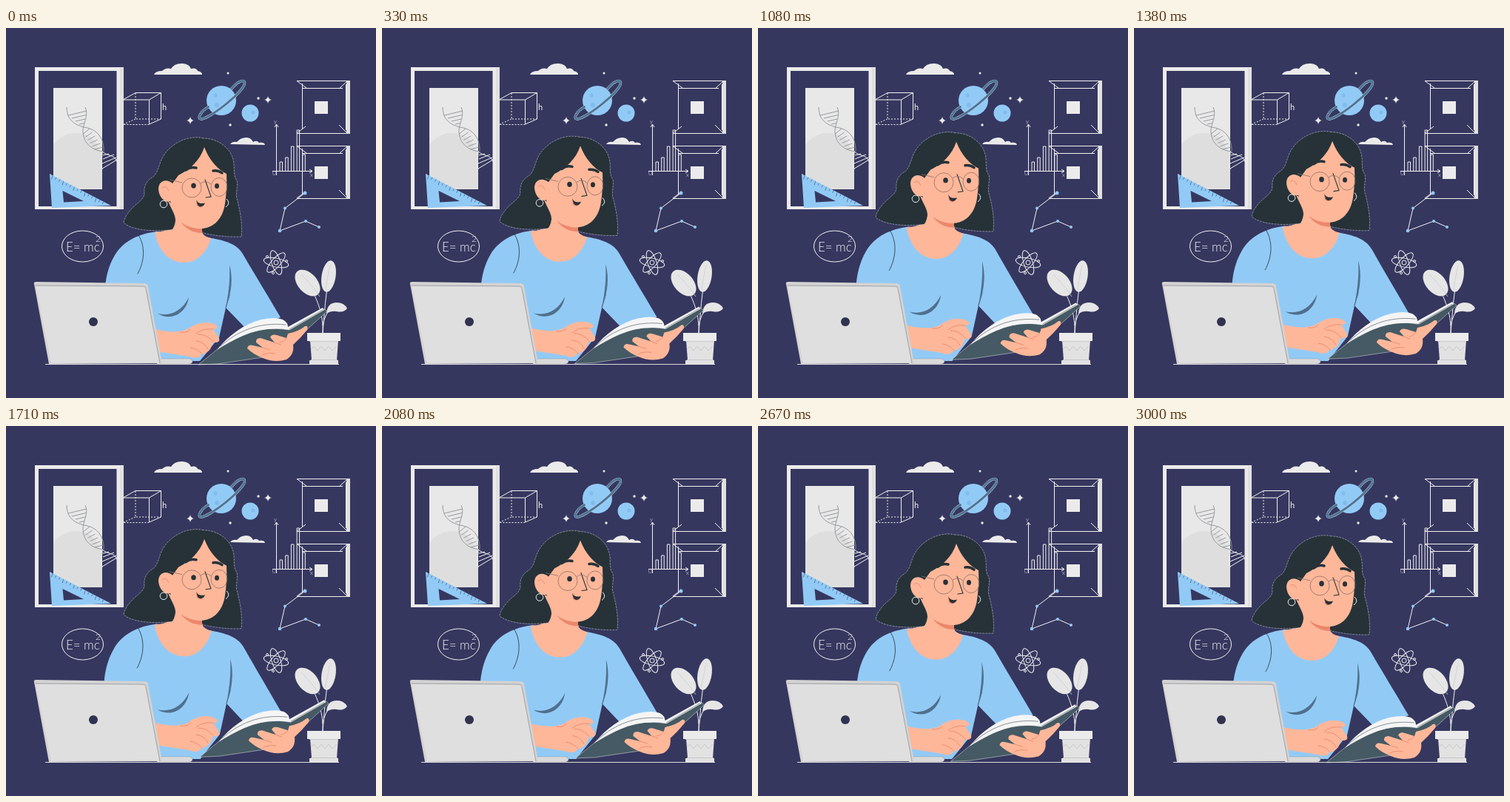
An HTML page that plays this animation: 500 px wide and 500 px high, repeating every 3040 ms.

```html
<!DOCTYPE html>
<html lang="en">
<head>
<meta charset="utf-8">
<title>Studying</title>
<style>
  html, body { margin: 0; width: 100%; height: 100%; overflow: hidden; background: #36375f; }
  svg { display: block; width: 100vw; height: 100vh; }
  .line { fill: none; stroke: #f2f2f2; stroke-width: 1; }
  .thin { fill: none; stroke: #263238; stroke-width: .8; stroke-linecap: round; }
  .pale { fill: #ebebeb; }
  .blue { fill: #92caf6; }
  .hair { fill: #263238; stroke: #d5d8e0; stroke-width: .5; stroke-dasharray: 3 1; }
  .skin { fill: #ffb799; }
  .crease { fill: none; stroke: #e68a70; stroke-width: .9; stroke-linecap: round; }
  text { font-family: Lato, sans-serif; font-weight: 300; fill: #f5f5f5; }
</style>
</head>
<body>
<svg viewBox="0 0 500 500" preserveAspectRatio="xMidYMid meet">
  <defs>
    <g id="box">
      <path class="line" d="M393 71.500H461M400 81.500H455M400.500 75V137M393 142.500H461M393 71.500L406 81M461 72L450 82M461 142L450 131M393 142L405 133"/>
      <path d="M460 71H465V143H460Z" fill="#e0e0e0"/>
      <path class="line" d="M459.500 76V138"/>
      <rect class="pale" x="417" y="99" width="18" height="17"/>
    </g>
    <path id="spark" class="pale" d="M0-5Q.8-.8 5 0Q.8.8 0 5Q-.8.8-5 0Q-.8-.8 0-5Z"/>
  </defs>
  <rect width="500" height="500" fill="#36375f"/>

  <!-- Picture frame, helix and set square -->
  <path class="pale" fill-rule="evenodd" d="M39 53H159V245H39ZM44 58V241H149.500V58Z"/>
  <path d="M154 54H159V245H154Z" fill="#e0e0e0"/>
  <rect x="64" y="81" width="66" height="137" fill="#e8e8e8"/>
  <path d="M64 158C77 140 103 136 118 151Q126 159 130 174V218H64Z" fill="#dedede"/>
  <g fill="none" stroke="#8e9296" stroke-width=".9">
    <path d="M82 107C82 122 90 130 105 134C122 136 133 148 132 167M107 107C112 118 105 126 104 138C104 154 113 164 131 167"/>
    <path id="rungs"/>
  </g>
  <path class="line" d="M130 167C138 174 145 170 150 180M130 167C130 178 127 184 130 191M131 172L139 170M131 177L146 171M130 183L149 175M130 190L150 178"/>
  <path class="blue" fill-rule="evenodd" d="M59 197L142 240L62 243ZM76.500 220L78 235.500L105 234Z"/>
  <path id="ticks" stroke="#42678e" stroke-width=".8"/>

  <!-- Cube -->
  <path class="line" d="M158 97H193.500V130M158 97L175 87.500H209.500V123L193.500 130M193.500 97L209.500 87.500"/>
  <path class="line" stroke-dasharray="2 2" d="M175 88V123H209M175 123L158 130.500H193"/>
  <text x="211" y="111" font-size="11" style="font-weight:400">h</text>

  <!-- Sky -->
  <path class="pale" d="M200 63Q202 58 211 58Q216 53 223 55Q228 47 239 48Q248 49 250 55Q257 53 259 58Q265 59 265 63Z"/>
  <path class="pale" d="M303 157Q306 153 312 154Q317 148 325 148Q331 148 334 154Q339 151 342 155Q349 154 350 158Z"/>
  <circle class="blue" cx="291" cy="98" r="20"/>
  <g fill="#7fbbee"><circle cx="283" cy="91" r="2.500"/><circle cx="285" cy="104" r="3"/></g>
  <g transform="translate(292 97.500) rotate(-38)" fill="none">
    <path d="M-19-4C-32-6-39-2-39 1C-38 10 38 10 39-1C39-5 31-7 19-4" stroke="#c4dbea" stroke-width="3.600"/>
    <path d="M-19-4C-32-6-39-2-39 1C-38 10 38 10 39-1C39-5 31-7 19-4" stroke="#4f7392" stroke-width="2.800"/>
  </g>
  <circle class="blue" cx="330" cy="115" r="11.500"/>
  <circle cx="334" cy="114" r="2.500" fill="#7fbbee"/>
  <use href="#spark" x="249" y="125"/><use href="#spark" x="354" y="97"/>
  <g class="pale"><circle cx="341" cy="95" r="1.700"/><circle cx="300" cy="61" r="1.500"/><circle cx="303" cy="131" r="1.700"/></g>

  <!-- Shelves and chart -->
  <use href="#box"/><use href="#box" y="88"/>
  <path class="line" d="M365.500 131V199M360 193.500H413M363 134L365.500 130L368 134M410 191L414 193.500L410 196"/>
  <path class="line" id="bars" stroke-width=".9"/>
  <g font-size="8"><text x="362" y="129">y</text><text x="411" y="201">x</text><text x="360" y="199">0</text></g>
  <path class="line" d="M404 223L377 243.500L370 274L405 261L423 269"/>
  <g class="blue"><circle cx="404" cy="223" r="2.500"/><circle cx="377" cy="243.500" r="2"/><circle cx="370" cy="274" r="2.300"/><circle cx="405" cy="261" r="2"/><circle cx="423" cy="269" r="2"/></g>

  <!-- Formula and atom -->
  <ellipse class="line" cx="103.500" cy="295" rx="28" ry="21"/>
  <g font-size="17"><text x="81" y="302">E=</text><text x="105" y="302">mc</text><text x="121" y="289" font-size="12">2</text></g>
  <g class="line" transform="translate(365 317)">
    <ellipse rx="17" ry="6" transform="rotate(12)"/><ellipse rx="17" ry="6" transform="rotate(72)"/><ellipse rx="17" ry="6" transform="rotate(132)"/>
    <circle r="3"/>
    <circle cx="-12" cy="-8" r="1.500"/><circle cx="14" cy="-2" r="1.500"/><circle cx="-4" cy="14" r="1.500"/>
  </g>

  <!-- Plant -->
  <path class="line" d="M428 412C429 390 423 370 408 344M428 412Q431 370 436 334M428 402Q431 386 440 378"/>
  <g fill="#e6e6e6">
    <ellipse cx="407.500" cy="344.500" rx="21" ry="13" transform="rotate(48 407.500 344.500)"/>
    <ellipse cx="436" cy="335.500" rx="9.500" ry="21.500" transform="rotate(9 436 335.500)"/>
    <path d="M433 386Q434 371 447 371Q457 371 461 379Q456 385 447 383Q439 382 433 386Z"/>
  </g>
  <path d="M399 333Q416 350 424 363M438 320Q434 340 431 356" fill="none" stroke="#cfcfd4" stroke-width=".8"/>

  <g id="torso">
    <path class="blue" d="M204 275C180 278 159 287 147 307C138 322 135 338 134 350L190 450H262L288 418L297 378L326 408L371 391C354 362 336 333 321 307C313 292 297 287 272 283Z"/>
    <path class="skin" d="M221 228L222 270Q216 275 201 276C205 298 218 317 241 317C259 317 272 302 277 284Q266 281 265 276V240Z"/>
    <path class="thin" d="M179 280C188 294 188 314 178 332M297 378L302 361"/>
    <path d="M302 320C307 337 305 359 297 378C301 357 303 341 302 320ZM205 386C223 390 238 382 247 364C244 385 224 397 205 386Z" fill="#4f708c"/>
  </g>

  <g id="head">
    <path class="hair" d="M267 149C246 144 224 156 214 171C206 182 207 194 199 201C188 207 186 216 187 225C185 233 175 238 169 245C163 252 160 257 159 263C167 271 192 277 229 272L243 260L267 277Q291 283 318 282C320 260 315 244 313 234C309 225 314 215 312 206C306 199 310 189 307 178C303 161 285 149 267 149Z"/>
    <path class="skin" d="M219 234C224 246 229 252 229 260Q228 270 222 275L227 285L265 281V263Z"/>
    <path d="M236 262Q248 272 265 270V277Q247 277 236 262Z" fill="#ec876c"/>
    <path class="skin" d="M268 161C262 179 249 191 233 199L225 210C217 203 206 206 206 218C207 230 216 237 222 234C227 252 238 268 258 271C280 273 293 258 296 237Q299 217 298 197C286 191 275 179 268 161Z"/>
    <path class="crease" d="M211 216Q216 211 220 220"/>
    <circle class="line" cx="213" cy="238" r="4.800" stroke-width=".8"/>
    <path class="line" d="M298 231Q304 237 297 242" stroke-width=".8"/>
    <g fill="none" stroke="#263238" stroke-linecap="round">
      <path d="M243 192Q249 187 257 189M280 193Q287 192 292 196" stroke-width="3.500"/>
      <path d="M269 205L277 228L270 229" stroke-width="1.100"/>
    </g>
    <g fill="#263238"><ellipse cx="253.500" cy="213" rx="3.300" ry="3.600"/><ellipse cx="285" cy="213.500" rx="3" ry="3.500"/></g>
    <g fill="none" stroke="#8a736a" stroke-width=".8">
      <circle cx="251" cy="216" r="13"/><ellipse cx="288" cy="215" rx="11" ry="12.500"/>
      <path d="M263 210Q270 205 277 211M238 209L221 205"/>
    </g>
    <path d="M257 233C259 237 264 238 269 237C267 242 262 244 258 240Z" fill="#e47f62"/>
    <path d="M257 232C260 238 264 237.500 269 236.500C266 242 262 243 259 239Z" fill="#263238"/>
  </g>

  <g id="book">
    <path d="M260 455L287 433L320 415Q350 402 383 408L431 380L434 383L395 418L347 445L286 454Z" fill="#455a64" stroke="#e6e6e6" stroke-width=".5"/>
    <path d="M285 435C302 414 322 400 345 394Q364 390 374 394Q381 398 381 404L428 378L430 381L383 408Q350 403 320 416Q301 424 285 435Z" fill="#f5f5f5"/>
    <path class="thin" d="M290 430C312 410 341 397 378 401M383 407L428 381" opacity=".65"/>
    <path class="skin" d="M326 433Q327 427 334 429L347 432L338 425Q337 419 344 419L363 425L357 418Q359 413 366 415L379 419L381 413Q396 410 404 403Q409 402 407 408Q398 419 388 428Q390 441 379 448Q363 453 347 446Q334 441 326 433Z"/>
    <path class="crease" d="M347 432L357 435M363 425L371 428M379 419Q376 424 370 425M346 442Q354 438 363 440"/>
  </g>

  <g id="hand">
    <path class="skin" d="M202 407C218 411 235 412 245 407Q259 397 273 398Q283 399 286 404Q286 407 280 407L288 419Q290 426 280 425L276 434Q271 440 265 441Q258 449 248 444L203 437Z"/>
    <path class="crease" d="M280 407Q266 405 257 413M280 424Q270 413 260 414M273 434Q268 424 257 423M265 441Q259 433 249 432M236 411Q246 412 249 407"/>
  </g>

  <!-- Desk, laptop and pot -->
  <path d="M53 454.500H450" stroke="#d9d9df"/>
  <path d="M204 447H248Q252 448 252 451Q251 454 247 454H204Z" fill="#dadada" stroke="#8d8f98" stroke-width=".4"/>
  <path d="M38 346Q37 343 41 343L187 345Q191 345 192 349L211 453L58 454Z" fill="#d3d3d3"/>
  <path d="M40 348L185 349Q188 349 189 352L208 453H61Z" fill="#dfdfdf"/>
  <path d="M40 348L185 349Q188 349 189 352L208 453" fill="none" stroke="#777b82" stroke-width=".6"/>
  <circle cx="118" cy="397" r="6" fill="#30324f"/>
  <path d="M411 422H449L447 449H449V455H410V449H413Z" fill="#e2e2e2"/>
  <path d="M407 412H452V423H407Z" fill="#ebebeb"/>
  <path d="M410 423.500H449M412 434L416 430L421 436L426 430L431 436L436 430L441 436L447 430M412 448.500H448" fill="none" stroke="#c6c6cb" stroke-width=".9"/>
</svg>
<script>
  const LOOP = 3040;
  const part = id => document.getElementById(id);
  const [torso, head, book, hand] = ["torso", "head", "book", "hand"].map(part);

  const repeat = (count, draw) => Array.from({ length: count }, (_, i) => draw(i)).join("");
  part("ticks").setAttribute("d", repeat(15, i => `M${63 + i * 4.9} ${199.5 + i * 2.54}l-1.500 ${i % 3 ? 3 : 5}`));
  part("rungs").setAttribute("d",
    repeat(4, i => `M${84 + i * 5} ${118 + i * 4}L${109 - i} ${112 + i * 5.5}`) +
    repeat(6, i => `M${104.5 + i * 3} ${143 + i * 4.2}L${113 + i * 3.6} ${136 + i * 5}`));
  part("bars").setAttribute("d", [181, 175, 160, 138, 171]
    .map((top, i) => `M${370 + i * 7.7} 193V${top}h3.500V193`).join(""));

  function render(time) {
    const breath = Math.sin(Math.PI * (time % LOOP) / LOOP) ** 1.5;
    const move = (el, x, y) => el.setAttribute("transform", `translate(${x * breath} ${y * breath})`);
    move(head, 0, -8.5);
    move(hand, 0, -6);
    move(book, 2, -8);
    torso.setAttribute("transform",
      `translate(230 450) scale(${1 + .015 * breath} ${1 + .044 * breath}) translate(-230 -450)`);
  }

  const start = performance.now();
  function tick() {
    render(performance.now() - start);
    requestAnimationFrame(tick);
  }
  tick();
</script>
</body>
</html>
```
